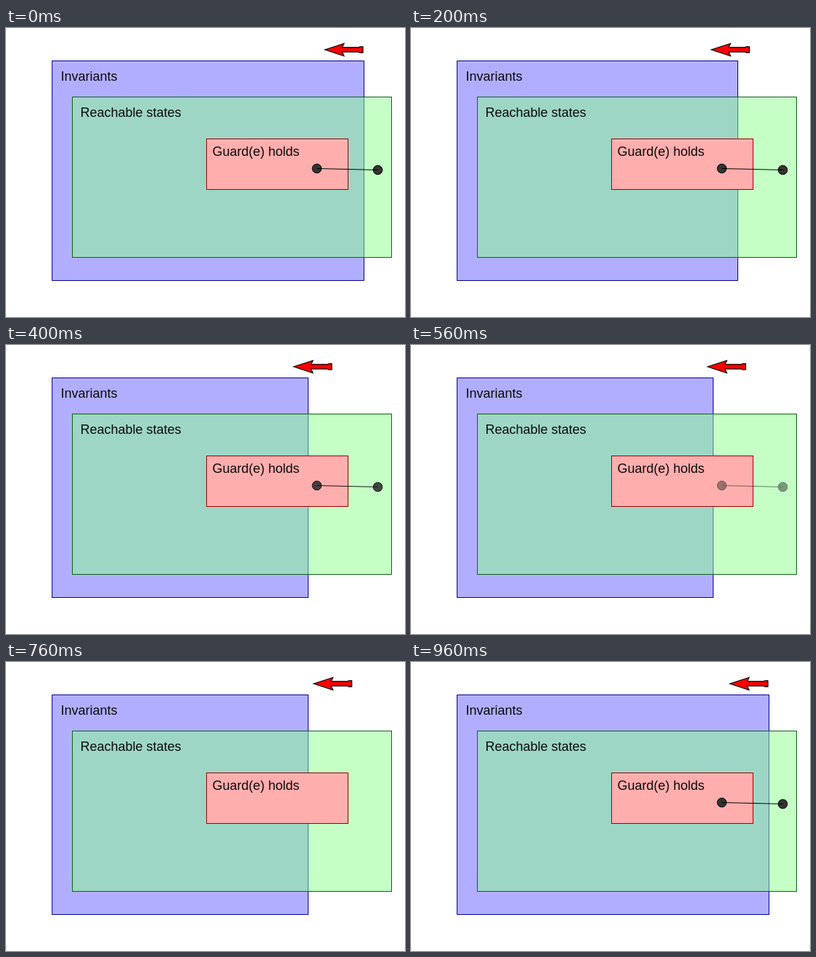
An HTML page that plays this animation: 550x400 px, repeating every 1 s.

```html
<!DOCTYPE html>
<html lang="en">
<head>
<meta charset="utf-8">
<style>
  html, body { margin: 0; width: 100%; height: 100%; overflow: hidden; background: #fff; }
  svg { display: block; width: 550px; height: 400px; }
  text { font: 18px "Liberation Sans", Arial, sans-serif; }
</style>
</head>
<body>
<svg viewBox="0 0 550 400">
  <rect id="invariants" x="63.5" y="45.5" height="304" fill="#b2aeff" stroke="#000099"/>
  <rect x="91.5" y="95.5" width="440" height="222" fill="#8cff8c" fill-opacity=".5" stroke="#0a6414"/>
  <rect x="276.5" y="153.5" width="195" height="70" fill="#ffaeae" stroke="#990000"/>
  <g fill="#0a0a0a">
    <text x="75.5" y="73">Invariants</text>
    <text x="102.5" y="123">Reachable states</text>
    <text x="284.5" y="177">Guard(e) holds</text>
  </g>
  <g id="transition" fill="#333" stroke="#000">
    <circle cx="428.5" cy="194.5" r="6.3"/>
    <circle cx="512.5" cy="196.5" r="6.3"/>
    <path d="M428.5 194.5L512.5 196.5"/>
  </g>
  <path id="arrow" d="M0.5 30L27 21.5L24.5 26.8L47 26.8L49 25.8H53V34.2H49L47 33.2L24.5 33.2L27 38.8Z"
        fill="#f00" stroke="#000" stroke-width="1.2"/>
</svg>
<script>
  const [invariants, transition, arrow] =
    ["invariants", "transition", "arrow"].map(id => document.getElementById(id));
  const STEP = 40, STEPS = 25, TURN = 9, GONE = 19, LAST = 24;
  const clamp = v => Math.min(1, Math.max(0, v));
  const mix = (a, b, k) => a + (b - a) * k;

  function draw(now) {
    const n = Math.floor(now / STEP) % STEPS;
    const reset = n === LAST;
    const shrink = reset ? 0 : clamp(n / TURN);
    const fade = reset ? 0 : clamp((n - TURN) / (GONE - TURN));
    const tip = n < TURN ? mix(439, 393, n / TURN)
                         : mix(393, 439, (n - TURN) / (LAST - TURN));

    invariants.setAttribute("width", Math.floor(mix(430, 353, shrink) + 0.01));
    transition.setAttribute("opacity", 1 - fade);
    arrow.setAttribute("transform", `translate(${tip.toFixed(2)} 0)`);
  }

  function tick() {
    draw(performance.now());
    requestAnimationFrame(tick);
  }
  tick();
</script>
</body>
</html>
```
